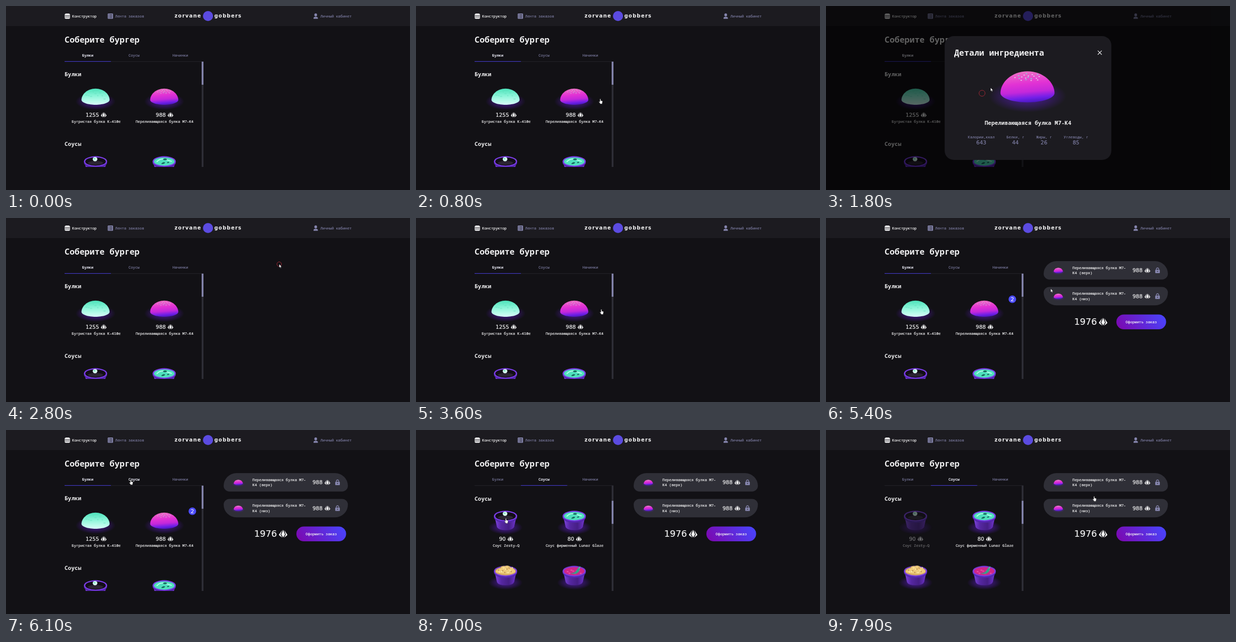
Animation of 800x367 px, one loop 8000 ms. Source, as an HTML page:

```html
<!DOCTYPE html>
<html lang="ru">
<head>
<meta charset="utf-8">
<title>Конструктор бургеров</title>
<style>
html, body { margin: 0; width: 100%; height: 100%; overflow: hidden; background: #121115; }
svg { display: block; width: 800px; height: 367px; }
text { font: 7.35px "Noto Sans Mono", "DejaVu Sans Mono", monospace; fill: #f2f2f3; stroke: #f2f2f3; stroke-width: .2px; white-space: pre; }
.mid { text-anchor: middle; }
.dim { fill: #8585ad; stroke: #8585ad; stroke-width: .1px; }
.h1, .h2 { font-weight: 600; stroke: none; }
.h1 { font-size: 16.5px; }
.h2 { font-size: 11px; }
.num { font: 10.4px "DejaVu Sans", sans-serif; }
.big { font-size: 17.7px; }
.logo { font: bold 10px "DejaVu Sans", sans-serif; letter-spacing: 1.2px; stroke: none; }
</style>
</head>
<body>
<svg id="stage" viewBox="0 0 800 367">
<defs>
  <linearGradient id="pink" x1=".4" y1="0" x2=".55" y2="1">
    <stop stop-color="#ee70c4"/><stop offset=".4" stop-color="#e232d4"/>
    <stop offset=".66" stop-color="#c428da"/><stop offset=".86" stop-color="#711fe8"/><stop offset="1" stop-color="#4a18c0"/>
  </linearGradient>
  <linearGradient id="mint" x1="0" y1="0" x2="0" y2="1">
    <stop stop-color="#4ce2ba"/><stop offset=".45" stop-color="#8cf5d9"/><stop offset="1" stop-color="#d8fff8"/>
  </linearGradient>
  <linearGradient id="cup" x1="0" y1="0" x2="1" y2="0">
    <stop stop-color="#8a4af0"/><stop offset=".3" stop-color="#5a2aa8"/>
    <stop offset=".65" stop-color="#482088"/><stop offset="1" stop-color="#7a3be0"/>
  </linearGradient>
  <linearGradient id="order" x1="0" y1=".6" x2="1" y2=".4">
    <stop stop-color="#7a0ab2"/><stop offset="1" stop-color="#4a42fa"/>
  </linearGradient>
  <radialGradient id="glow">
    <stop stop-color="#6a22e0" stop-opacity=".7"/><stop offset=".6" stop-color="#5a1cc0" stop-opacity=".35"/>
    <stop offset="1" stop-color="#5a1cc0" stop-opacity="0"/>
  </radialGradient>
  <clipPath id="view"><rect x="116" y="111" width="271" height="210"/></clipPath>
  <path id="dome" d="M-53 12C-53-9-31-31 0-31S53-9 53 12C53 23 27 30.5 0 30.5S-53 23-53 12Z"/>
  <path id="gem" fill="#f2f2f3" d="M0-5.3 2.5 1 0 4.8-2.5 1Z M-1.4-4.9-5.6 1.2-5 2.4-1.1 5.2-3.5 1.2Z M1.4-4.9 5.6 1.2 5 2.4 1.1 5.2 3.5 1.2Z"/>
</defs>
</svg>
<script>
const LOOP = 8000;
const BUN = 'Переливающаяся булка M7-K4';
const stage = document.getElementById('stage');

const at = (x, y, s, body) => `<g transform="translate(${x} ${y}) scale(${s})">${body}</g>`;
const text = (x, y, cls, s) => `<text x="${x}" y="${y}" class="${cls}">${s}</text>`;
const rect = (x, y, w, h, fill, r = 0) =>
  `<rect x="${x}" y="${y}" width="${w}" height="${h}" rx="${r}" fill="${fill}"/>`;
const oval = (x, y, rx, ry, fill) =>
  `<ellipse cx="${x}" cy="${y}" rx="${rx}" ry="${ry}" fill="${fill}"/>`;
const path = (d, fill, extra = '') => `<path d="${d}" fill="${fill}" ${extra}/>`;
const many = (n, f) => Array.from({ length: n }, (_, i) => f(i)).join('');
const gem = (x, y, s = 1) => at(x, y, s, '<use href="#gem"/>');

// food
const seeds = many(19, i => {
  const a = i * 2.4, r = Math.sqrt(i / 19);
  return oval(1 + 27 * r * Math.cos(a), -19 + 8.5 * r * Math.sin(a), 1.5, 1, i % 3 ? '#e9c6ee' : '#7fd6d8');
});
const craters = many(9, i =>
  oval(-34 + i * 8.5, -6 - 13 * Math.sin(i * .4) + i % 3 * 7, 5 - i % 2 * 2, 2.2, '#5fe0bd'));
const bun = (x, y, s, kind) => at(x, y, s,
  oval(0, 18, 76, 32, 'url(#glow)') + `<use href="#dome" fill="url(#${kind})"/>` +
  (kind === 'pink' ? seeds : `<g opacity=".45">${craters}</g>`));

const bowl = (x, y, fill, top) => at(x, y, 1,
  oval(0, 23, 34, 14, 'url(#glow)') +
  path('M-21.500 2-17 22Q-14 28 0 28T17 22L21.500 2Z', 'url(#cup)') +
  path(many(13, i => { const k = (i - 6) / 6; return `M${k * 20} ${13 - 6 * k * k}L${k * 16} ${27 - 4 * k * k}`; }),
    'none', 'stroke="#36176f" stroke-width=".7" opacity=".45"') +
  path('M-22.800 0V4Q-18 13.500 0 13.500T22.800 4V0Z', '#5426ae') +
  oval(0, 0, 23, 10.4, '#7c3ee8') + oval(0, .2, 20.3, 8.3, fill) + top);

const sauces = {
  dark: oval(0, 3, 15, 4, '#2b2433') + oval(-1, -4.5, 4.6, 4.2, '#d9fff1') + oval(-2, -5.5, 2, 1.6, '#7fe3c4'),
  mint: path('M-15 1Q-8-7 2-4T15 0', 'none', 'stroke="#b4ffe9" stroke-width="2"') +
    path('M-6 5Q-3 0 2 2 0 6-6 5Z M-3-4Q2-8 6-4 2-1-3-4Z M5 3Q8-1 10 2 9 4 5 3Z', '#17685f'),
  gold: path('M-19 2Q-18-4-12-5-9-11-1-10 5-13 11-7 19-5 19 2 8 9-19 2Z', '#efcc7c') +
    many(14, i => oval(-14 + i * 2.1, -2 + 5 * Math.sin(i * 2.3), 1.5, 1.1, i % 2 ? '#fff0b4' : '#b98645')),
  rose: many(8, i => oval(-13 + i * 3.7, 1 + 3.5 * Math.sin(i * 2), 2.2, 1, '#ee5aa8')) +
    path('M-9 4Q1 5 5-2T11-6Q11 1 6 4T-9 4Z', '#2fa58b') + path('M9-5 12-9', 'none', 'stroke="#4cd6a0" stroke-width="1.5"')
};

const card = (cx, y, price, name, art, id = '') => {
  const x = cx - (6.6 * price.length + 15) / 2;
  return `<g id="${id}">${art}${text(x, y + 4, 'num', price)}` +
    gem(x + 6.6 * price.length + 9.3, y) + text(cx, y + 15.6, 'mid', name) + '</g>';
};

const lock = at(656.5, 104.5, 1,
  path('M-2.4-1V-2.6a2.4 2.4 0 0 1 4.8 0V-1', 'none', 'stroke="#8585ad" stroke-width="1.3"') +
  rect(-4.6, -1.2, 9.2, 6.6, '#8585ad', 1.2) + oval(0, 2, 1, 1, '#2f2f37'));

// large radius on the outer side of the pair, small on the inner
const pill = path('M431 111.200a25.200 25.200 0 0 1 25.200-25.200H651.800a25.200 25.200 0 0 1 25.200 25.200a11.500 11.500 0 0 1-11.500 11.500H442.500a11.500 11.500 0 0 1-11.500-11.500Z', '#2f2f37');
const slot = (dy, side, flip) => at(0, dy, 1,
  (flip ? `<g transform="matrix(1 0 0 -1 0 208.700)">${pill}</g>` : pill) + bun(460, 104.5, .17, 'pink') +
  text(488, 101.6, '', BUN.slice(0, -2)) + text(488, 112, '', `${BUN.slice(-2)} (${side})`) +
  text(607, 108.2, 'num', '988') + gem(636.5, 104.5) + lock);

const header = rect(0, 0, 800, 40, '#1c1b20') +
  path('M116 18.6Q116 15 119.5 15H123.500Q127 15 127 18.600Z M116 19.6H127V21.600H116Z M116 22.600H127Q127 25.400 124.500 25.400H118.500Q116 25.400 116 22.600Z', '#f2f2f3') +
  text(131, 22.7, '', 'Конструктор') +
  rect(201.5, 15, 10.5, 10.5, '#8585ad', 1.2) +
  many(3, i => rect(203, 17 + i * 2.8, 1.2, 1, '#1c1b20') + rect(205.2, 17 + i * 2.8, 5, 1, '#1c1b20')) +
  text(216, 22.7, 'dim', 'Лента заказов') +
  '<g text-anchor="end">' + text(387, 23, 'logo', 'zorvane') + '</g>' +
  oval(400, 20, 10, 10, '#5b4be0') + text(412.5, 23, 'logo', 'gobbers') +
  oval(613.3, 17.8, 2.7, 3, '#8585ad') + path('M609 25.500V24Q609 21.500 613.300 21.500T617.600 24V25.500Z', '#8585ad') +
  text(622.6, 22.7, 'dim', 'Личный кабинет');

const tabs = ['Булки', 'Соусы', 'Начинки'].map((s, i) =>
  text(161.8 + i * 91.7, 101, 'mid dim', s) +
  (i < 2 ? `<g id="tab${i}">${text(161.8 + i * 91.7, 101, 'mid', s)}</g>` : '')).join('') +
  rect(116, 110.5, 275, .7, '#2f2f37') + `<g id="line">${rect(116, 110.1, 91.7, 1, '#463cde')}</g>`;

const list = `<g clip-path="url(#view)"><g id="list">` +
  text(116, 140.4, 'h2', 'Булки') +
  card(178.5, 217, '1255', 'Бугристая булка K-410e', bun(177.3, 181, .525, 'mint')) +
  card(314, 217, '988', BUN, bun(313.3, 181, .525, 'pink'), 'pinkCard') +
  `<g id="badge">${oval(369, 162, 7.5, 7.5, '#4c4cff')}${text(369, 165.9, 'num mid', '2')}</g>` +
  text(116, 279, 'h2', 'Соусы') +
  card(178.5, 355.5, '90', 'Соус Zesty-Q', bowl(177.3, 310, '#120e17', sauces.dark), 'darkCard') +
  card(314, 355.5, '80', 'Соус фирменный Lunar Glaze', bowl(313.3, 310, '#4fe0bd', sauces.mint)) +
  bowl(177.3, 420, '#d9ae5c', sauces.gold) + bowl(313.3, 420, '#cf2688', sauces.rose) +
  '</g></g>' + rect(387.5, 111, 3.5, 210, '#2f2f37') +
  `<g id="thumb">${rect(387.5, 111, 3.5, 46, '#8585ad')}</g>`;

const basket = `<g id="basket">${slot(0, 'верх')}${slot(51.5, 'низ', true)}` +
  text(491.5, 213.4, 'num big', '1976') + gem(548.8, 207, 1.5) +
  rect(575, 192.500, 98.5, 29.500, 'url(#order)', 14.75) + text(624.2, 210, 'mid', 'Оформить заказ') + '</g>';

const facts = [[307.5, 'Калории,ккал', 643], [375, 'Белки, г', 44], [431.700, 'Жиры, г', 26], [495, 'Углеводы, г', 85]];
const modal = `<g id="modal">${rect(0, 0, 800, 367, 'rgba(0,0,0,.6)')}${rect(235, 60, 330, 247, '#1c1b20', 18.3)}` +
  text(253.7, 99.2, 'h1', 'Детали ингредиента') +
  path('M538.200 89.200 546 97M546 89.200 538.200 97', 'none', 'stroke="#f2f2f3" stroke-width="1.200"') +
  bun(399, 161.5, 1.01, 'pink') + text(400, 236.8, 'h2 mid', BUN) +
  facts.map(([x, s, n]) => text(x, 264, 'mid dim', s) + text(x, 276.3, 'num mid dim', n)).join('') + '</g>';

const pointer = `<g id="rings"></g><g id="cursor">` +
  `<g id="hand">${path('M-.9.8Q0-.6.9.8V3.800L3.500 4.300Q4.500 4.600 4.400 5.800L3.800 8.600V10.200H-.700V9L-2.900 6.400Q-3.200 5.300-2 5.400L-.9 6.300Z', '#fff', 'stroke="#0a0a0c" stroke-width=".5"')}</g>` +
  `<g id="arrow">${path('M0 0V7L1.600 5.600 2.700 8.100 3.800 7.600 2.700 5.200H4.800Z', '#fff', 'stroke="#0a0a0c" stroke-width=".4"')}</g></g>`;

stage.insertAdjacentHTML('beforeend',
  header + text(116, 73.4, 'h1', 'Соберите бургер') + tabs + list + basket + modal + pointer);

// motion
const run = (el, frames) => el.animate(frames, { duration: LOOP, iterations: Infinity });
const track = (el, prop, steps, easing = () => 'step-end') =>
  run(el, [...steps, [LOOP, steps.at(-1)[1]]].map(([t, v], i, all) => ({
    offset: t / LOOP, [prop]: v, easing: i < all.length - 1 ? easing(t, all[i + 1][0]) : 'linear'
  })));
const hold = (id, prop, ...steps) => track(document.getElementById(id), prop, steps);
const shift = (x, y) => `translate(${x}px,${y}px)`;
const perTick = (a, b) => `steps(${Math.max(1, Math.round((b - a) / 100))},end)`;

hold('modal', 'opacity', [0, 0], [1700, 1], [2800, 0]);
hold('pinkCard', 'opacity', [0, 1], [4100, .4], [5100, 1]);
hold('darkCard', 'opacity', [0, 1], [7200, .4]);
hold('badge', 'opacity', [0, 0], [5100, 1]);
hold('basket', 'opacity', [0, 0], [5100, 1]);
hold('tab0', 'opacity', [0, 1], [6300, 0]);
hold('tab1', 'opacity', [0, 0], [6000, 1]);
hold('line', 'transform', [0, shift(0, 0)], [6300, shift(91.7, 0)]);

const scroll = [[0, 0], [6300, .06], [6400, .36], [6500, .78], [6600, 1]];
hold('list', 'transform', ...scroll.map(([t, k]) => [t, shift(0, -138.5 * k)]));
hold('thumb', 'transform', ...scroll.map(([t, k]) => [t, shift(0, 30.2 * k)]));

const route = [
  [0, 470, 236], [300, 470, 236], [700, 365, 185], [1000, 365, 185], [1500, 309, 174], [1700, 309, 174],
  [1800, 326, 163], [2400, 541, 92], [2800, 541, 92], [3500, 367, 182], [4000, 367, 182],
  [4800, 511, 155], [5200, 511, 155], [6000, 247, 99], [6500, 247, 99], [7000, 178, 176],
  [7200, 178, 176], [7800, 531, 132]
];
track(document.getElementById('cursor'), 'transform', route.map(([t, x, y]) => [t, shift(x, y)]), perTick);
hold('cursor', 'opacity', [0, 0], [300, 1]);
const handOn = [[0, 0], [600, 1], [1700, 0], [2400, 1], [2800, 0], [3400, 1], [5200, 0], [6000, 1], [6600, 0], [6800, 1]];
hold('hand', 'opacity', ...handOn);
hold('arrow', 'opacity', ...handOn.map(([t, v]) => [t, 1 - v]));

const click = (t, x, y) => {
  const ring = document.createElementNS(stage.namespaceURI, 'circle');
  for (const [k, v] of Object.entries({ cx: x, cy: y, r: 0, fill: 'none', stroke: '#b02c38', 'stroke-width': .9 }))
    ring.setAttribute(k, v);
  document.getElementById('rings').append(ring);
  track(ring, 'r', [[0, '0px'], [t, '2.5px'], [t + 100, '4.5px'], [t + 200, '6px'], [t + 300, '0px']]);
};
click(1600, 309, 174);
click(2700, 541, 92);
click(6200, 247, 99);
</script>
</body>
</html>
```
